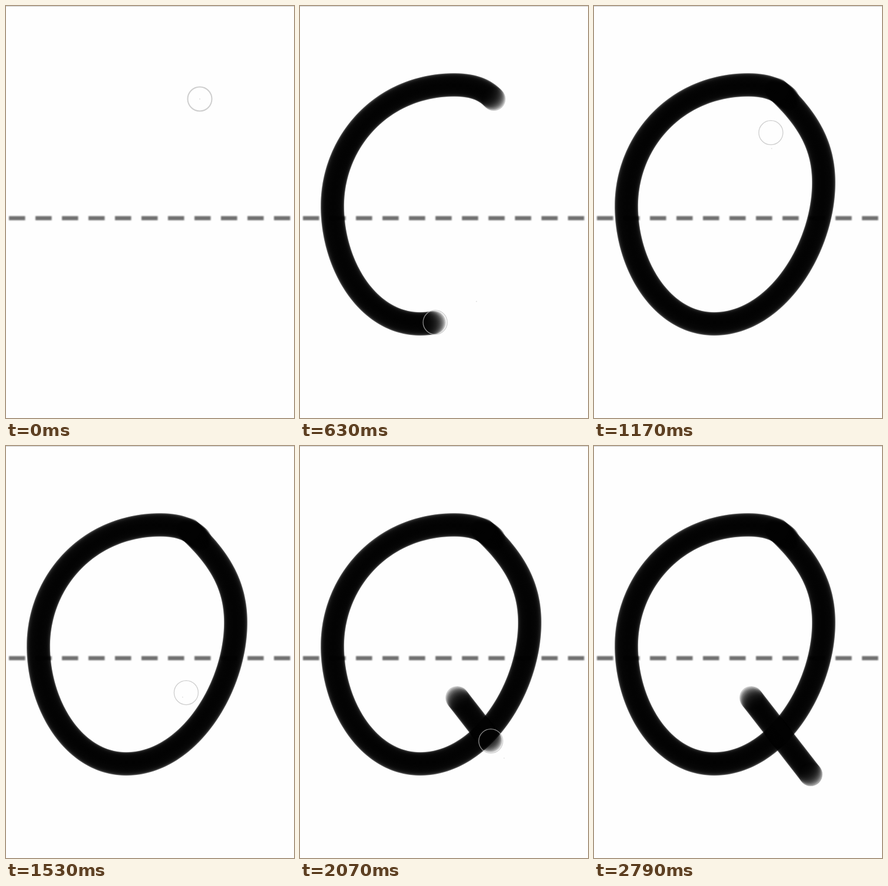
These frames come from a looping animation (489 px wide and 700 px high, 9060 ms). An HTML page with a canvas:

```html
<!DOCTYPE html>
<html lang="en">
<head>
<meta charset="utf-8">
<title>Writing the letter Q</title>
<style>
html, body { margin: 0; width: 100%; height: 100%; overflow: hidden; background: #fefefe; }
canvas { display: block; width: 489px; height: 700px; }
</style>
</head>
<body>
<canvas id="stage" width="489" height="700"></canvas>
<script>
const LOOP = 9060, STEP = 2, LEAD = 42, BRUSH = 20, RING = 20.5;
const ctx = document.getElementById('stage').getContext('2d');

// Points spaced evenly along an SVG path
function sample(d) {
  const path = document.createElementNS('http://www.w3.org/2000/svg', 'path');
  path.setAttribute('d', d);
  const length = path.getTotalLength(), points = [];
  for (let s = 0; s < length; s += STEP) points.push(path.getPointAtLength(s));
  points.push(path.getPointAtLength(length));
  return points;
}

function lengthNear(points, x, y) {
  let best = 0, least = Infinity;
  points.forEach((p, i) => {
    const gap = Math.hypot(p.x - x, p.y - y);
    if (gap < least) { least = gap; best = i; }
  });
  return best * STEP;
}

const endOf = points => (points.length - 1) * STEP;

// Cubic Hermite through keys of [time, distance, speed]
function hermite(keys, t) {
  if (t <= keys[0][0]) return keys[0][1];
  for (let i = 1; i < keys.length; i++) {
    const [t0, d0, v0] = keys[i - 1], [t1, d1, v1] = keys[i];
    if (t > t1) continue;
    const h = t1 - t0, u = (t - t0) / h, w = 1 - u;
    return d0 * (1 + 2 * u) * w * w + h * v0 * u * w * w
         + d1 * u * u * (3 - 2 * u) - h * v1 * u * u * w;
  }
  return keys[keys.length - 1][1];
}

// Distance along a move's path, kept within its ends
const travel = ({ points, keys }, t) =>
  Math.min(Math.max(hermite(keys, t), 0), endOf(points));

const bowl = sample('M329 158 C312 140 290 134 262 134 C140 134 55 230 55 340 ' +
  'C55 440 115 540 204 540 C310 540 390 410 390 300 C390 238 364 192 310 142');
const hop = sample('M310 142 C285 118 312 300 306 419 C300 435 262 440 267 428');
const tail = sample('M267 428 L368 558');
const exit = sample('M368 558 C400 540 450 420 512 371');

const moves = [
  { points: bowl, ink: true, until: 945, keys: [
    [0, 0, 0],
    [330, lengthNear(bowl, 176, 153), 1.3],
    [630, lengthNear(bowl, 228, 538), 1.8],
    [840, lengthNear(bowl, 371, 219), 1.5],
    [930, endOf(bowl), 0.4]] },
  { points: hop, until: 1875, keys: [
    [945, 0, 0], [1530, lengthNear(hop, 306, 419), 0.24], [1860, endOf(hop), 0]] },
  { points: tail, ink: true, until: 2220, keys: [
    [1875, 0, 0], [2070, lengthNear(tail, 322, 501), 0.9], [2190, endOf(tail), 0]] },
  { points: exit, until: 2790, keys: [[2220, 0, 0], [2790, endOf(exit), 0.3]] }
];

function place(t) {
  const move = moves.find(m => t < m.until) || moves[moves.length - 1];
  const s = travel(move, t) / STEP, i = Math.floor(s), u = s - i;
  const a = move.points[i], b = move.points[i + 1] || a;
  return { x: a.x + (b.x - a.x) * u, y: a.y + (b.y - a.y) * u };
}

function circle(p, r) {
  ctx.beginPath();
  ctx.arc(p.x, p.y, r, 0, 2 * Math.PI);
}

function drawPaper() {
  ctx.fillStyle = '#fefefe';
  ctx.fillRect(0, 0, 489, 700);
  ctx.fillStyle = '#cbcbcb';
  ctx.fillRect(0, 0, 489, 1);
  ctx.filter = 'blur(0.9px)';
  ctx.fillStyle = '#707070';
  for (let x = 5; x < 489; x += 45) ctx.fillRect(x, 357, 27.5, 7);
  ctx.filter = 'none';
}

// Overlapping translucent dabs leave soft ends and a solid middle
function drawInk(t) {
  ctx.fillStyle = 'rgba(0, 0, 0, 0.2)';
  for (const move of moves) {
    if (!move.ink || t < move.keys[0][0] + 25) continue;
    const count = Math.floor(travel(move, t) / STEP) + 1;
    for (const p of move.points.slice(0, count)) {
      circle(p, BRUSH);
      ctx.fill();
    }
  }
}

function drawCursor(t) {
  if (t >= 2790) return;
  ctx.strokeStyle = 'rgba(190, 190, 190, 0.75)';
  ctx.lineWidth = t < 30 ? 2 : 1.3;
  circle(place(t), RING);
  ctx.stroke();
  ctx.fillStyle = 'rgba(200, 200, 200, 0.6)';
  circle(place(t < 30 ? t : t + LEAD), 0.9);
  ctx.fill();
}

function draw(t) {
  drawPaper();
  drawInk(t);
  drawCursor(t);
}

const start = performance.now();
function tick() {
  draw((performance.now() - start) % LOOP);
  requestAnimationFrame(tick);
}
tick();
</script>
</body>
</html>
```
